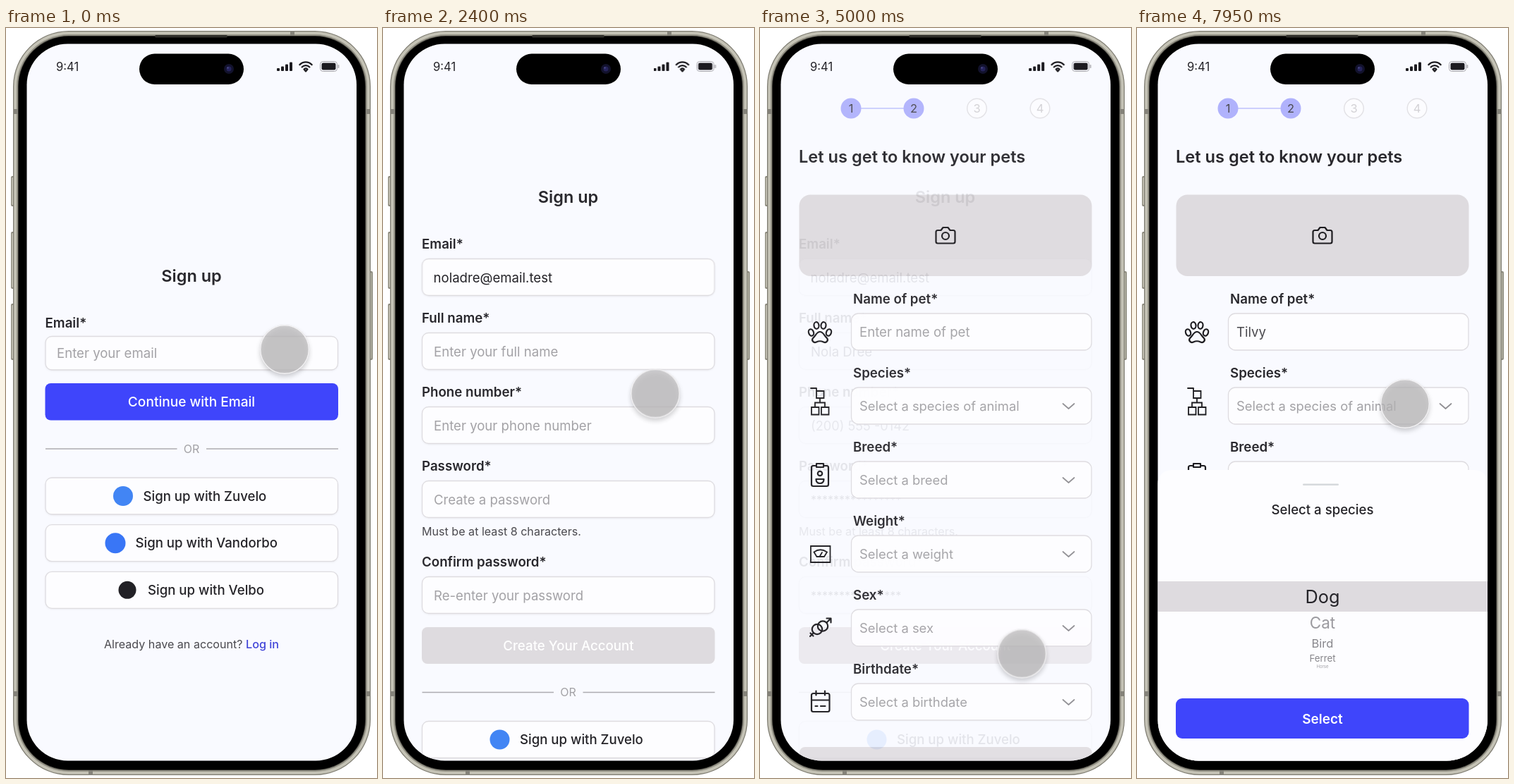
Animation of 526x1064 px, one loop 8 s. Source, as an HTML page:

```html
<!DOCTYPE html>
<html lang="en">
<head>
<meta charset="utf-8">
<title>Sign up flow</title>
<style>
  html, body { margin: 0; width: 100%; height: 100%; overflow: hidden; background: #fff; }
  svg { display: block; width: 526px; height: 1064px; }
  text { font-family: Inter, "Open Sans", sans-serif; fill: #242328; white-space: pre; }
  .label, .title { font-weight: 600; fill: #29282d; }
  .mid { font-weight: 500; }
  .hint { fill: #a3a2a6; }
  .soft { fill: #4a494e; }
  .white { fill: #fff; }
  .link { fill: #4145d8; font-weight: 500; }
  .box, .flat { fill: #fdfdff; stroke: #dedce0; stroke-width: 1.3; }
  .box { filter: drop-shadow(0 1px 1px #0000000d); }
  .icon { fill: none; stroke: #1d1c20; stroke-width: 2.2; stroke-linejoin: round; stroke-linecap: round; }
  .thin { stroke-width: 1.8; stroke-linejoin: miter; }
  .chev { fill: none; stroke: #8f8e93; stroke-width: 1.7; stroke-linecap: round; stroke-linejoin: round; }
  .rule { stroke: #adacb0; stroke-width: 1.4; }

  [class*="a-"] { animation: 8s ease-out infinite both; }
  .a-mail-in { animation-name: mailIn; }
  .a-mail-out { animation-name: mailOut; }
  .a-info-in { animation-name: infoIn; }
  .a-info-out { animation-name: infoOut; }
  .a-pass-in { animation-name: passIn; }
  .a-pass-out { animation-name: passOut; }
  .a-pet-in { animation-name: petIn; }
  .a-pet-out { animation-name: petOut; }
  .a-form { animation-name: formIn; }
  .a-next { animation-name: nextOut; }
  .a-create { animation-name: create; }
  .a-active { animation-name: active; }
  .a-leave { animation-name: leave; }
  .a-pets { animation-name: petsIn; }
  .a-head { animation-name: head; }
  .a-mailbox { animation-name: mailbox; }
  .a-mailtext { animation-name: mailtext; }
  .a-social { animation-name: social; }
  .a-status { animation-name: status; }
  .a-sheet { animation-name: sheet; }
  .a-touch { animation-name: touch; }

  @keyframes mailIn { 0%, 1.875% { opacity: 0 } 12.5%, 100% { opacity: 1 } }
  @keyframes mailOut { 0%, 1.875% { opacity: 1 } 12.5%, 100% { opacity: 0 } }
  @keyframes infoIn { 0%, 30% { opacity: 0 } 36.25%, 100% { opacity: 1 } }
  @keyframes infoOut { 0%, 30% { opacity: 1 } 36.25%, 100% { opacity: 0 } }
  @keyframes passIn { 0%, 38.75% { opacity: 0 } 50.625%, 100% { opacity: 1 } }
  @keyframes passOut { 0%, 38.75% { opacity: 1 } 50.625%, 100% { opacity: 0 } }
  @keyframes petIn { 0%, 78.75% { opacity: 0 } 88.75%, 100% { opacity: 1 } }
  @keyframes petOut { 0%, 78.75% { opacity: 1 } 88.75%, 100% { opacity: 0 } }
  @keyframes formIn { 0%, 12.5% { opacity: 0 } 26.875%, 100% { opacity: 1 } }
  @keyframes nextOut { 0%, 12.5% { opacity: 1 } 26.875%, 100% { opacity: 0 } }
  @keyframes create {
    0%, 12.5% { opacity: 0 } 26.875%, 52.5% { opacity: 1 }
    62.5% { opacity: .5 } 65%, 100% { opacity: 0 }
  }
  @keyframes active { 0%, 38.75% { opacity: 0 } 50.625%, 52.5% { opacity: 1 } 62.5%, 100% { opacity: 0 } }
  @keyframes leave { 0%, 52.5% { opacity: 1 } 62.5% { opacity: .1 } 65%, 100% { opacity: 0 } }
  @keyframes petsIn { 0%, 52.5% { opacity: 0 } 62.5% { opacity: .96 } 65%, 100% { opacity: 1 } }
  @keyframes head { 0%, 12.5% { transform: none } 26.875%, 100% { transform: translate(-.5px, -112px) } }
  @keyframes mailbox {
    0%, 12.5% { transform: none; height: 47.5px }
    26.875%, 100% { transform: translate(-.5px, -110px); height: 52px }
  }
  @keyframes mailtext { 0%, 12.5% { transform: none } 26.875%, 100% { transform: translate(-.5px, -107px) } }
  @keyframes social { 0%, 12.5% { transform: none } 26.875%, 100% { transform: translate(-.5px, 345.5px) } }
  @keyframes status {
    0%, 12.5% { transform: none } 26.875%, 52.5% { transform: translateX(-.5px) }
    65%, 100% { transform: translateX(-3px) }
  }
  @keyframes sheet { 0%, 90.625% { transform: translateY(425px) } 99.375%, 100% { transform: none } }
  @keyframes touch {
    0%, 1.875% { transform: translate(395px, 456px) }
    12.5% { transform: translate(395px, 497px) }
    26.875%, 30% { transform: translate(386px, 518.5px) }
    36.25%, 38.75% { transform: translate(395px, 530px) }
    50.625%, 52.5% { transform: translate(376.5px, 903px) }
    65%, 67.5% { transform: translate(371px, 886.5px) }
    76.875%, 90.625% { transform: translate(370px, 435px) }
    99.375%, 100% { transform: translate(380px, 533px) }
  }
</style>
</head>
<body>
<svg id="stage" viewBox="0 0 526 1064"></svg>
<script>
const BLUE = '#3f45fb', GREY = '#dedbdf', PAPER = '#f9faff';

const rect = (x, y, w, h, r, fill, cls = '') =>
  `<rect x="${x}" y="${y}" width="${w}" height="${h}" rx="${r}" class="${cls}" ${fill ? `fill="${fill}"` : ''}/>`;
const circle = (x, y, r, attrs) => `<circle cx="${x}" cy="${y}" r="${r}" ${attrs}/>`;
const path = (d, cls = 'icon') => `<path d="${d}" class="${cls}"/>`;
const group = (cls, ...parts) => `<g class="${cls}">${parts.join('')}</g>`;

// y is the middle of the capitals
const text = (x, y, str, size, cls = '', anchor = 'start', fill = '') =>
  `<text x="${x}" y="${y + size * .36}" font-size="${size}" class="${cls}" text-anchor="${anchor}"${fill && ` style="fill:${fill}"`}>${str}</text>`;
const centred = (y, str, size, cls, fill) => text(263, y, str, size, cls, 'middle', fill);
const label = (x, y, str) => text(x, y, str, 18.7, 'label');
const swap = (x, y, hint, value, step, size = 18.6, cls = '') =>
  group(`a-${step}-out`, text(x, y, hint, 18.6, 'hint')) +
  group(`a-${step}-in`, text(x, y, value, size, cls));

function phone() {
  const shell = ([inset, colour]) => rect(10 + inset, 4 + inset, 507 - 2 * inset, 1056 - 2 * inset, 79 - inset, colour);
  const metal = [[0, '#7d7b70'], [1.2, '#c5c3b6'], [5, '#949286'], [7, '#2c2b27']];
  const keys = [[7, 210, 43], [7, 289, 81], [7, 391, 80], [515, 345, 126]];
  const bands = [[10, 115, 7, 7], [510, 115, 7, 7], [10, 941, 7, 7], [510, 941, 7, 7], [403, 4, 6, 7], [117, 1053, 6, 7]];
  return keys.map(([x, y, h]) => rect(x, y, 5, h, 2, '#8d8b7e') + rect(x + 1.2, y + 2, 2, h - 4, 1, '#c3c1b3')).join('') +
    metal.map(shell).join('') +
    bands.map(([x, y, w, h]) => rect(x, y, w, h, 0, '#85837a')).join('') +
    shell([8, '#000']) + screen(PAPER) +
    rect(211, 10, 103, 3.5, 1.7, '#302f2b');
}

function screen(fill) {
  return rect(29.5, 22.5, 467.5, 1017, 58, fill);
}

function statusBar() {
  const bars = [4, 6.5, 9.5, 12.5].map((h, i) => rect(384 + i * 6, 61 - h, 4, h, 1, '#1c1b20')).join('');
  const arc = r => path(`M${425 - r * .72} ${61 - r * .74}A${r} ${r} 0 0 1 ${425 + r * .72} ${61 - r * .74}`);
  return text(71, 55.5, '9:41', 16.6) +
    group('a-status', bars, arc(12), arc(7.5), path('M422.5 58.5Q425 56.3 427.5 58.5L425 61.5Z'),
      '<rect x="445.5" y="47.5" width="24" height="14" rx="4" fill="none" stroke="#a8a7ac"/>',
      rect(447.5, 49.5, 20, 10, 2.2, '#1c1b20'), rect(470.7, 52, 1.6, 5, .8, '#a8a7ac')) +
    rect(189, 36.5, 148, 43.5, 21.7, '#000') +
    circle(316, 58, 7, 'fill="#12122c"') + circle(316, 58, 3.5, 'fill="#25235a"') + circle(314.5, 56.5, 1.2, 'fill="#4b4a86"');
}

function signUp() {
  const social = (y, dot, r, colour, x, name) =>
    rect(56, y - 26, 414.5, 52, 9, '', 'box') + circle(dot, y, r, `fill="${colour}"`) +
    text(x, y, 'Sign up with ' + name, 18.6, 'mid');
  const field = (y, title, hint, value, step, size, cls) =>
    label(55, y - 48, title) + rect(55.5, y - 26.5, 414.5, 52, 9, '', 'box') + swap(72, y, hint, value, step, size, cls);
  return group('a-leave',
    group('a-head', centred(352, 'Sign up', 23.5, 'title'), label(55.5, 418, 'Email*')),
    rect(56, 437.5, 414.5, 47.5, 9, '', 'box a-mailbox'),
    group('a-mailtext', swap(72, 461, 'Enter your email', 'noladre@email.test', 'mail')),
    group('a-next', rect(55.5, 504, 415.5, 52.5, 8, BLUE), centred(530.5, 'Continue with Email', 19.1, 'mid white')),
    group('a-form',
      field(459, 'Full name*', 'Enter your full name', 'Nola Dree', 'info'),
      field(564, 'Phone number*', 'Enter your phone number', '(200) 555 -0142', 'info', 18.2, 'soft'),
      field(669, 'Password*', 'Create a password', '*'.repeat(16), 'pass', 16),
      text(55, 714, 'Must be at least 8 characters.', 16.1, 'soft'),
      field(805, 'Confirm password*', 'Re-enter your password', '*'.repeat(16), 'pass', 16)),
    group('a-social',
      '<path class="rule" d="M56 597H242.5M284 597H471"/>', centred(597, 'OR', 16, 'hint'),
      social(664, 166, 14, '#4285f4', 194.5, 'Zuvelo'),
      social(730.7, 155, 14.5, '#3976f6', 183.5, 'Vandorbo'),
      social(797.3, 172, 12.5, '#222126', 201, 'Velbo'),
      text(139, 874, 'Already have an account?', 16.1, 'soft'), text(340, 874, 'Log in', 16.2, 'link'))) +
    group('a-create', rect(55, 850, 415.5, 52, 8, GREY),
      group('a-active', rect(55, 850, 415.5, 52, 8, BLUE)),
      centred(876, 'Create Your Account', 18.7, 'mid white'));
}

function petsBase() {
  const steps = [129, 218, 307.5, 397].map((x, i) => i < 2
    ? circle(x, 114, 14.5, 'fill="#b0b2fc"') + text(x, 114, i + 1, 16.5, 'soft', 'middle')
    : circle(x, 114, 13.8, 'fill="#fcfcff" stroke="#e2e1e5" stroke-width="1.4"') +
      text(x, 114, i + 1, 16.5, '', 'middle', '#d3d2d6')).join('');
  const camera = 'M252 287h4.5l3-4h7l3 4h4.5q2.5 0 2.5 2.5v13.5q0 2.5-2.5 2.5h-22q-2.5 0-2.5-2.5v-13.5q0-2.5 2.5-2.5Z';
  return group('a-pets', '<path d="M143 114H204" stroke="#bec0fd" stroke-width="1.6"/>', steps,
    text(55, 183, 'Let us get to know your pets', 23.6, 'title'),
    rect(55.5, 236.5, 415, 115.5, 16, GREY),
    path(camera), circle(263, 295, 5, 'class="icon"'),
    rect(56, 1020, 414.5, 50, 8, GREY));
}

function petIcons() {
  const toe = (x, y, a) => `<ellipse cx="${x}" cy="${y}" rx="3.5" ry="4.8" class="icon" transform="rotate(${a} ${x} ${y})"/>`;
  return toe(72.5, 432, -20) + toe(80, 422, -8) + toe(90, 422, 8) + toe(97.5, 432, 20) +
    path('M85 431C80 431 79 437 75.5 439.5C72 443 76 447.5 80 445.5Q85 443 90 445.5C94 447.5 98 443 94.5 439.5C91 437 90 431 85 431Z') +
    path('M72 511H80M80 515h10.5v10H80ZM85 525v6.5M78 538v-6.5h14v6.5M73 538h10.5v10.5H73ZM87 538h10.5v10.5H87ZM80 511v4', 'icon thin') +
    path('M80 621H75.5q-2.5 0-2.5 2.5v24q0 2.5 2.5 2.5h19q2.5 0 2.5-2.5v-24q0-2.5-2.5-2.5H90M80 618h10v5H80Z') +
    circle(85, 632, 3.2, 'class="icon"') + path('M79.5 640h11q0 6-5.5 6t-5.5-6Z') +
    path('M72 735h27.5v23H72ZM76.5 743.5Q85.5 737 95 743.5L91 750H80.5ZM85 749l3-5', 'icon thin') +
    circle(81, 853, 7.2, 'class="icon"') + circle(89, 848.5, 7.2, 'class="icon"') +
    path('M94.5 843.5L100 838M94.5 837.5H100.5V843.5M76 858L71 863M71.5 858.5L75.5 862.5') +
    path('M76 944h20q2.5 0 2.5 2.5v21q0 2.5-2.5 2.5H75.5q-2.5 0-2.5-2.5v-21q0-2.5 3-2.5ZM73 953.5H98.5M79.5 940.5v6M92 940.5v6M78.5 962h3M86 962h6.5');
}

function petsForm() {
  const rows = [['Name of pet', 'Enter name of pet'], ['Species', 'Select a species of animal'], ['Breed', 'Select a breed'],
    ['Weight', 'Select a weight'], ['Sex', 'Select a sex'], ['Birthdate', 'Select a birthdate']];
  return group('a-pets', petIcons(), ...rows.map(([name, hint], i) => {
    const y = 431 + i * 105;
    return label(132, y - 47, name + '*') + rect(129.5, y - 26, 340.5, 52, 10, '', 'flat') +
      (i ? text(141, y, hint, 18.4, 'hint') + path(`M429.5 ${y - 3}L437.5 ${y + 4}L445.5 ${y - 3}`, 'chev')
         : swap(141, y, hint, 'Tilvy', 'pet', 18.6, 'soft'));
  }));
}

function sheet() {
  const more = [[844, 'Cat', 22.5, '#9b9a9f'], [873, 'Bird', 16.5, '#87868b'], [894, 'Ferret', 13.3, '#87868b'], [906, 'Horse', 6, '#a09fa4']];
  return group('a-sheet', rect(29, 627, 469, 440, 20, '#fdfdff'),
    rect(235, 646.5, 51, 2.6, 1.3, '#d6d9dc'), centred(683, 'Select a species', 18.6, 'mid'),
    rect(29, 785, 469, 43, 0, GREY), centred(807, 'Dog', 25.3),
    ...more.map(([y, name, size, colour]) => centred(y, name, size, '', colour)),
    rect(55, 951, 415.5, 57, 9, BLUE), centred(980, 'Select', 19, 'label white'));
}

const touch = group('a-touch',
  '<circle r="35" fill="#bebcbe" fill-opacity=".73" style="filter:drop-shadow(0 4px 3px #0000003d)"/>',
  '<circle r="34.3" fill="none" stroke="#f4f3f5" stroke-width="1.4"/>');

document.getElementById('stage').innerHTML =
  `<clipPath id="screen">${screen()}</clipPath>` + phone() +
  `<g clip-path="url(#screen)">${petsBase()}${signUp()}${petsForm()}${statusBar()}${sheet()}${touch}</g>`;
</script>
</body>
</html>
```
